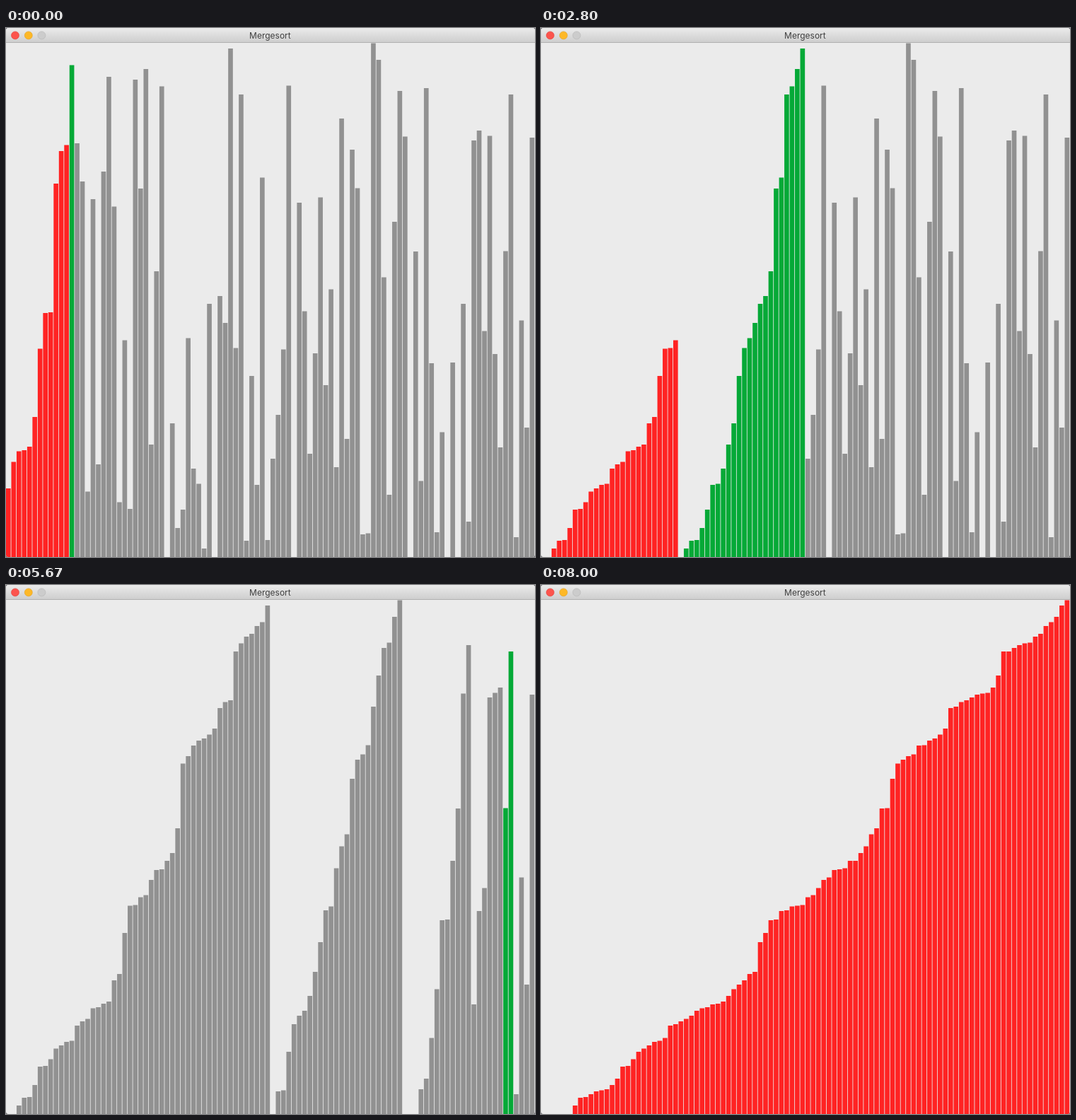
Animation of 748x748 px, one loop 8540 ms. Source, as an HTML page:

```html
<!DOCTYPE html>
<html lang="en">
<head>
<meta charset="utf-8">
<title>Mergesort</title>
<style>
  html, body { margin: 0; width: 100%; height: 100%; overflow: hidden; background: #6a6a6e; }
  svg { display: block; width: 100%; height: 100%; }
  text { font: 12px Inter, "Open Sans", sans-serif; fill: #404040; text-anchor: middle; }
</style>
</head>
<body>
<svg viewBox="0 0 748 748" xmlns="http://www.w3.org/2000/svg">
  <defs>
    <linearGradient id="titleBar" x2="0" y2="1">
      <stop offset="0" stop-color="#ebebeb"/>
      <stop offset="1" stop-color="#cecece"/>
    </linearGradient>
    <clipPath id="window"><rect width="748" height="748" rx="3.5"/></clipPath>
  </defs>
  <g clip-path="url(#window)">
    <rect width="748" height="748" fill="#ebebeb"/>
    <rect width="748" height="20" fill="url(#titleBar)"/>
    <rect y="20" width="748" height="1" fill="#b0b0b0"/>
    <g stroke-width=".6">
      <circle cx="13" cy="10.4" r="5.5" fill="#fc544d" stroke="#e0443e"/>
      <circle cx="31.8" cy="10.4" r="5.5" fill="#fdb827" stroke="#dfa023"/>
      <circle cx="50.4" cy="10.4" r="5.5" fill="#cccccc" stroke="#b4b4b4"/>
    </g>
    <text x="373.4" y="14.8">Mergesort</text>
    <g id="bars"></g>
  </g>
</svg>
<script>
const SIZE = 748, PITCH = 7.48, BAR_WIDTH = 6.65;
const GRAY = '#919191', RED = '#ff2323', GREEN = '#05a937';
const LOOP = 8540, LAST_FRAME = 120;

// Top edge of every bar; the first 13 are already in order.
const tops = [
  651, 613.5, 598.5, 597, 592, 550, 453.5, 403, 402, 220, 174, 165.5, 52.5, 163, 217, 655.5, 242, 617, 203, 69,
  252.5, 670.5, 441.5, 680, 73, 227, 58, 589, 344, 82.5, 748, 559, 707, 681, 438.5, 623, 644.5, 736, 390, 748,
  379, 417, 29, 452.5, 94, 725, 492, 646, 211.5, 724, 609, 547, 454.5, 81.5, 748, 247, 400.5, 602, 460, 239.5,
  505, 369.5, 621, 128, 581, 172, 226.5, 716, 714.5, 21.5, 45, 352.5, 660, 274, 89, 153.5, 748, 316, 640.5, 85,
  474, 713, 571.5, 748, 473, 748, 390, 698, 159, 145, 428.5, 152.5, 461, 593, 315.5, 94, 720, 413.5, 565, 155
];

// Every redraw of the sort: the split range is green, merged bars turn red.
const states = [];
const record = (lo, hi, merged) => states.push({ lo, hi, merged, tops: tops.slice() });

function mergeSort(lo, hi) {
  if (lo >= hi) return;
  record(lo, hi, 0);
  const mid = (lo + hi) >> 1;
  mergeSort(lo, mid);
  mergeSort(mid + 1, hi);
  const left = tops.slice(lo, mid + 1), right = tops.slice(mid + 1, hi + 1);
  for (let k = lo; k <= hi; k++) {
    const takeLeft = left.length && (!right.length || left[0] >= right[0]);
    tops[k] = (takeLeft ? left : right).shift();
    record(lo, hi, k - lo + 1);
  }
}
mergeSort(0, tops.length - 1);

const firstState = states.findIndex(s => s.hi === 12 && s.merged === 12);

// Pace of the sort: [frame, redraws since the start]
const pace = [[0, 0], [24, 146], [26, 155], [42, 249], [46, 274], [70, 414], [85, 503], [104, 616], [120, 712]];

function stateAt(frame) {
  const i = Math.max(1, pace.findIndex(p => p[0] >= frame));
  const [f0, n0] = pace[i - 1], [f1, n1] = pace[i];
  const step = Math.round(n0 + (n1 - n0) * (frame - f0) / (f1 - f0));
  return states[Math.min(firstState + step, states.length - 1)];
}

const group = document.getElementById('bars');
const bars = tops.map((_, i) => {
  const bar = document.createElementNS('http://www.w3.org/2000/svg', 'rect');
  bar.setAttribute('x', (i * PITCH).toFixed(2));
  bar.setAttribute('width', BAR_WIDTH);
  return group.appendChild(bar);
});

function render(time) {
  // 15 frames per second, with starts rounded to 10 ms
  const tick = Math.floor((time % LOOP) / 10) * 10;
  const frame = Math.min(LAST_FRAME, Math.floor((tick + 5) * 0.015 + 1e-6));
  const { lo, hi, merged, tops } = stateAt(frame);
  bars.forEach((bar, i) => {
    const color = i < lo || i > hi ? GRAY : i < lo + merged ? RED : GREEN;
    bar.setAttribute('y', tops[i]);
    bar.setAttribute('height', SIZE - tops[i]);
    bar.setAttribute('fill', color);
  });
}

const start = performance.now();
function loop() {
  render(performance.now() - start);
  requestAnimationFrame(loop);
}
loop();
</script>
</body>
</html>
```
